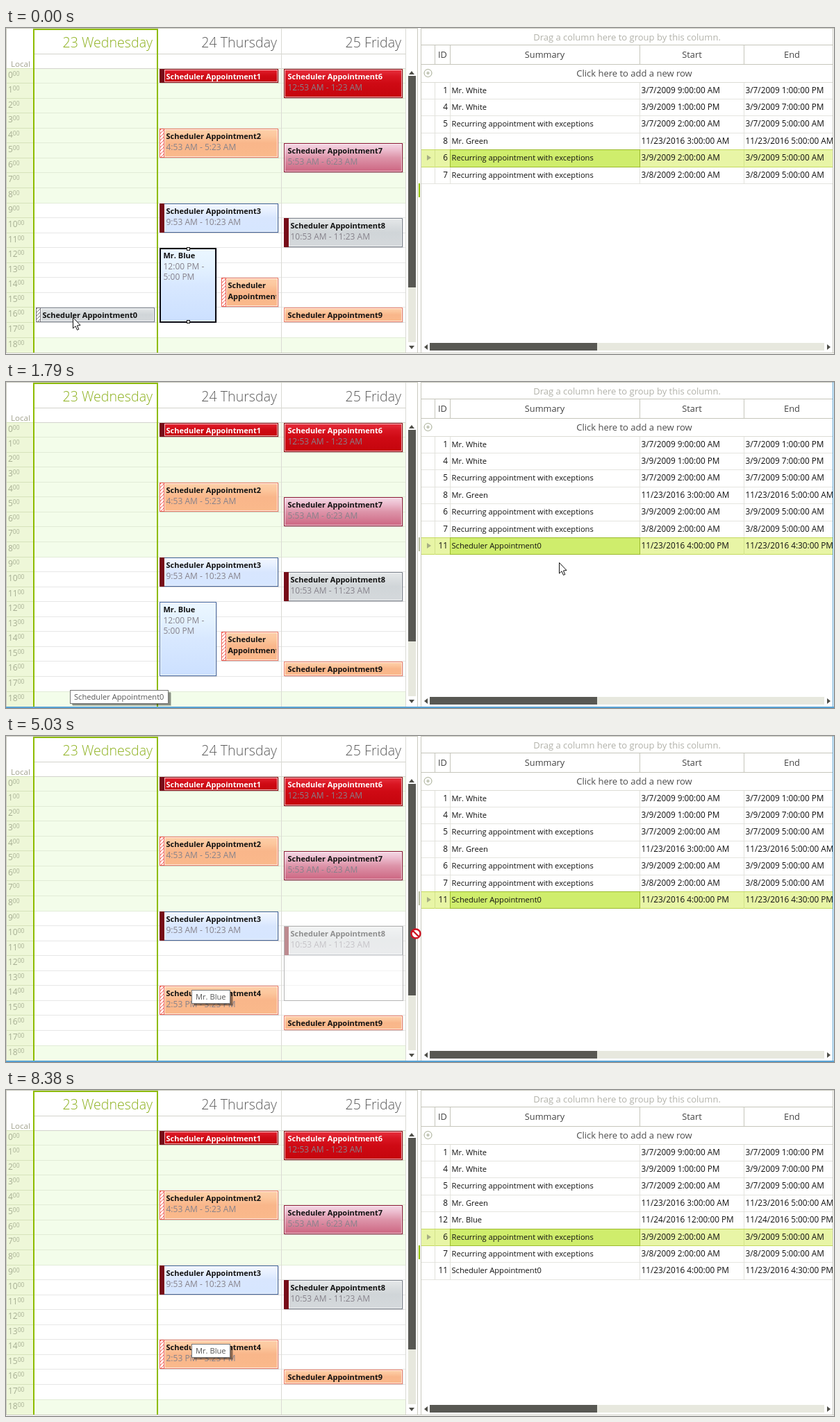
Recreate the animation shown at these times as an HTML page with a canvas. Size 1192 by 470 pixels, loop 8540 ms.

```html
<!DOCTYPE html>
<html lang="en">
<head>
<meta charset="utf-8">
<title>Scheduler drag and drop</title>
<style>
html, body { margin: 0; width: 100%; height: 100%; overflow: hidden; background: #fff; }
canvas { display: block; }
</style>
</head>
<body>
<canvas id="stage" width="1192" height="470"></canvas>
<script>
const ctx = document.getElementById('stage').getContext('2d');
const LOOP = 8540, STEP = 120;
const FONT = '"Open Sans", "Noto Sans", sans-serif';
const DRAG1 = 760, DROP1 = 1790, DRAG2 = 4910, DROP2 = 6240, END = 8380;
const GREEN = '#8ebc00', LINE = '#c9c9bf', INK = '#111';

const hourY = h => 59 + Math.round(21.55 * h - 0.4);
const rowY = i => Math.floor(79 + 24.4 * i);

// start time, steps, end point, pointer kind
const path = [
  [0, 1, 96, 417, 'arrow'],
  [120, 1, 89, 419, 'arrow'],
  [370, 3, 94, 415, 'arrow'],
  [760, 1, 273, 410, 'stop'],
  [880, 1, 452, 392, 'stop'],
  [1000, 1, 622, 359, 'drag'],
  [1150, 4, 796, 260, 'drag'],
  [1790, 1, 796, 260, 'arrow'],
  [2820, 6, 375, 400, 'arrow'],
  [3570, 3, 261, 343, 'arrow'],
  [3960, 1, 259, 338, 'arrow'],
  [4910, 1, 430, 300, 'stop'],
  [5030, 1, 590, 285, 'stop'],
  [5150, 1, 744, 258, 'drag'],
  [5300, 2, 786, 182, 'drag'],
  [5570, 3, 697, 174, 'drag'],
  [6240, 1, 697, 174, 'arrow'],
  [7140, 1, 752, 190, 'arrow'],
  [7260, 7, 800, 442, 'arrow'],
  [8380, 1, 0, 0, 'none']
];

const orange = { fill: ['#fdd0aa', '#fcc79d', '#f9b68a', '#fab98b'], edge: '#f0816a', hatch: '#ee5a50' };
const grey = { fill: ['#e6e9ea', '#dadee0', '#d0d5d8', '#d5d9dc'], edge: '#7c848e' };
const red = { fill: ['#e93442', '#d91622', '#cf0a14', '#c4040c'], edge: '#8d0710', ink: '#fff' };
const pink = { fill: ['#f5dbe8', '#ebbacc', '#dd94a9', '#cc6480'], edge: '#8f1738' };
const blue = { fill: ['#f3f7ff', '#e7f0ff', '#d8e6fe', '#d6e6ff'], edge: '#45689f' };
const sky = { fill: ['#ecf7ff', '#e4f2ff', '#d8e8ff', '#cce0ff'], edge: '#4a6da6' };

function rect(x, y, w, h, color) {
  ctx.fillStyle = color;
  ctx.fillRect(x, y, w, h);
}

function frame(x, y, w, h, color) {
  ctx.strokeStyle = color;
  ctx.lineWidth = 1;
  ctx.strokeRect(x + 0.5, y + 0.5, w - 1, h - 1);
}

function text(s, x, y, size, color, align = 'left', weight = 400) {
  ctx.font = `${weight} ${size}px ${FONT}`;
  ctx.fillStyle = color;
  ctx.textAlign = align;
  ctx.fillText(s, x, y);
}

function poly(points, fill) {
  ctx.beginPath();
  points.forEach(([x, y]) => ctx.lineTo(x, y));
  ctx.closePath();
  ctx.fillStyle = fill;
  ctx.fill();
}

function clipped(x, y, w, h, draw) {
  ctx.save();
  ctx.beginPath();
  ctx.rect(x, y, w, h);
  ctx.clip();
  draw();
  ctx.restore();
}

function hatch(x, y, h, color) {
  rect(x, y, 7, h, '#fff');
  clipped(x, y, 7, h, () => {
    ctx.strokeStyle = color;
    ctx.lineWidth = 1;
    ctx.beginPath();
    for (let k = 3; k < h + 10; k += 5) {
      ctx.moveTo(x, y + k);
      ctx.lineTo(x + 7, y + k - 7);
    }
    ctx.stroke();
  });
  frame(x, y, 7, h, color);
}

function appointment(x, hour, w, hours, look, bar, title, lines = []) {
  const y = hourY(hour), h = hourY(hour + hours) - y - 1;
  rect(x + 1, y + 1, w, h, 'rgba(90,90,100,.2)');
  const g = ctx.createLinearGradient(0, y, 0, y + h);
  look.fill.forEach((c, i) => g.addColorStop([0, 0.25, 0.5, 1][i], c));
  rect(x, y, w, h, g);
  const inset = bar ? 7 : 1;
  frame(x + inset, y + 1, w - inset - 1, h - 2, 'rgba(255,255,255,.7)');
  frame(x, y, w, h, look.edge);
  if (bar === 'busy') rect(x, y, 7, h, '#760c18');
  if (bar === 'tentative') hatch(x, y, h, look.hatch || '#77757d');
  const tx = x + (bar ? 9.5 : 5.5);
  clipped(x, y, w - 3, h, () => {
    text(title, tx, y + 14.5, 11, look.ink || INK, 'left', 700);
    lines.forEach(([s, bold], i) =>
      text(s, tx, y + 30.5 + i * 15.5, bold ? 11 : 12, bold ? INK : '#86828b', 'left', bold ? 700 : 400));
  });
}

function ghost(x, hour, hours) {
  const y = hourY(hour), h = hourY(hour + hours) - y;
  rect(x, y, 172, h, 'rgba(255,255,255,.52)');
  frame(x, y, 172, h, '#b4b4b4');
}

function calendar(t) {
  // grid
  rect(41, 59, 534, hourY(9) - 59, '#f3fdea');
  rect(41, hourY(18), 534, 468 - hourY(18), '#f3fdea');
  rect(1, 59, 38, 409, '#eef7d8');
  for (let h = 0; h < 19; h++) {
    const y = hourY(h);
    rect(41, y - 1, 534, 1, h < 10 || h > 17 ? '#e2ecd7' : '#e7e7e7');
    rect(1, y - 1, 38, 1, '#d6e2bb');
    text(h, 3, y + 13, 12, '#a7af93');
    text('00', 3 + ctx.measureText(h).width, y + 9.5, 8.5, '#a7af93');
  }
  text('Local', 7, 56, 11.6, '#a3a38f');
  rect(0, 0, 593, 1, LINE);
  rect(0, 0, 1, 469, LINE);
  rect(41, 37, 534, 1, '#d4d4cd');
  rect(41, 58, 534, 1, '#d4d4cd');
  rect(396, 1, 1, 467, '#dadad4');
  rect(575, 1, 1, 467, '#dadad4');
  rect(39, 1, 180, 2, GREEN);
  rect(39, 1, 2, 467, GREEN);
  rect(217, 1, 2, 467, GREEN);
  text('23 Wednesday', 211, 28, 19.6, '#8cb01c', 'right', 300);
  text('24 Thursday', 390, 28, 19.6, '#5c5c5c', 'right', 300);
  text('25 Friday', 569, 28, 19.6, '#5c5c5c', 'right', 300);

  // appointments
  const name = n => 'Scheduler Appointment' + n;
  if (t < DRAG1) appointment(43, 16, 171, 1, grey, 'tentative', name(0));
  appointment(221, 0, 171, 1, red, 'busy', name(1));
  appointment(221, 4, 171, 2, orange, 'tentative', name(2), [['4:53 AM - 5:23 AM']]);
  appointment(221, 9, 171, 2, blue, 'busy', name(3), [['9:53 AM - 10:23 AM']]);
  if (t < DRAG2) {
    appointment(221, 12, 82, 5, sky, '', 'Mr. Blue', [['12:00 PM -'], ['5:00 PM']]);
    appointment(310, 14, 82, 2, orange, 'tentative', 'Scheduler', [['Appointment4', true]]);
  } else {
    appointment(221, 14, 171, 2, orange, 'tentative', name(4), [['2:53 PM - 3:23 PM']]);
  }
  appointment(400, 0, 171, 2, red, '', name(6), [['12:53 AM - 1:23 AM']]);
  appointment(400, 5, 171, 2, pink, '', name(7), [['5:53 AM - 6:23 AM']]);
  appointment(400, 10, 171, 2, grey, 'busy', name(8), [['10:53 AM - 11:23 AM']]);
  appointment(400, 16, 171, 1, orange, '', name(9));

  if (t < DRAG1) {
    ctx.strokeStyle = '#0b0b14';
    ctx.lineWidth = 2;
    ctx.strokeRect(222, 318, 80, 106);
    for (const y of [316, 421]) {
      rect(260, y, 5, 5, INK);
      rect(261, y + 1, 3, 3, '#fff');
    }
  } else if (t < 880) {
    ghost(43, 16, 1);
    rect(125, 401, 5, 1, '#222');
  } else if (t < DROP1) {
    ghost(400, 15, 1);
  }
  if (t >= DRAG2 && t < DROP2) ghost(400, 10, 5);

  // vertical scroll bar
  rect(579, 69, 11, 384, '#e7e8de');
  rect(579, 69, 11, 305, '#585853');
  poly([[580, 67], [588, 67], [584, 62]], '#4e4e48');
  poly([[580, 458], [588, 458], [584, 463]], '#4e4e48');
  rect(592, 0, 1, 468, LINE);
  const dim = t >= DROP1 && t < DROP2;
  rect(594, 224, 2, 20, dim ? '#b5bb9e' : GREEN);
}

function rowsAt(t) {
  const repeat = 'Recurring appointment with exceptions';
  const day = (d, a, b) => [`${d} ${a}:00:00 `, `${d} ${b}:00:00 `];
  const [w1, w2] = day('3/7/2009', 9, 1), [x1, x2] = day('3/9/2009', 1, 7);
  const rec = d => day(d, 2, 5).map(s => s + 'AM');
  const rows = [
    [1, 'Mr. White', w1 + 'AM', w2 + 'PM'],
    [4, 'Mr. White', x1 + 'PM', x2 + 'PM'],
    [5, repeat, ...rec('3/7/2009')],
    [8, 'Mr. Green', ...day('11/23/2016', 3, 5).map(s => s + 'AM')],
    [6, repeat, ...rec('3/9/2009')],
    [7, repeat, ...rec('3/8/2009')]
  ];
  if (t >= DROP1) rows.push([11, 'Scheduler Appointment0', '11/23/2016 4:00:00 PM', '11/23/2016 4:30:00 PM']);
  if (t >= DROP2) rows.splice(4, 0, [12, 'Mr. Blue', ...day('11/24/2016', 12, 5).map(s => s + 'PM')]);
  return rows;
}

function table(t, pointer) {
  const right = 1190, columns = [617, 639, 912, 1062];
  rect(597, 0, 595, 1, LINE);
  rect(597, 0, 1, 468, LINE);
  for (const y of [24, 52]) rect(598, y, right - 598, 1, '#c6c6bc');
  rect(598, 78, right - 598, 1, '#dcdcd5');
  for (const x of columns) rect(x, 24, 1, 29, '#c6c6bc');
  text('Drag a column here to group by this column.', 894, 18, 13, '#b2b2aa', 'center');
  text('ID', 628.5, 43, 12.8, '#444', 'center');
  text('Summary', 775.5, 43, 12.8, '#444', 'center');
  text('Start', 987.5, 43, 12.8, '#444', 'center');
  text('End', 1131.5, 43, 12.8, '#444', 'center');
  text('Click here to add a new row', 904.5, 70, 13, '#4c4c4c', 'center');
  ctx.strokeStyle = '#a4aa91';
  ctx.lineWidth = 1;
  ctx.beginPath();
  ctx.arc(607.5, 65, 5.5, 0, Math.PI * 2);
  ctx.stroke();
  rect(605, 64.5, 5, 1, '#a4aa91');
  rect(607, 62.5, 1, 5, '#a4aa91');

  const rows = rowsAt(t);
  const current = t >= DROP1 && t < DROP2 ? 11 : 6;
  const hover = pointer.kind === 'arrow' && pointer.x > 598 ? Math.floor((pointer.y - 79) / 24.4) : -1;
  rows.forEach(([id, summary, start, end], i) => {
    const y = rowY(i), h = rowY(i + 1) - y, base = y + 15;
    const on = id === current;
    if (on) rect(598, y, right - 598, h, '#e8f5a6');
    else if (i === hover) rect(598, y, right - 598, h, '#f3f5f5');
    rect(598, y + h - 1, right - 598, 1, on ? '#c5da60' : '#e5e5e0');
    for (const x of columns) rect(x, y, 1, h, on ? '#d3e38c' : '#e2e2dc');
    if (on) {
      rect(598, y - 1, right - 598, 1, '#c5da60');
      rect(639, y - 1, 274, h + 1, '#cfed6c');
      frame(639, y - 1, 274, h + 1, '#9cbb2e');
      poly([[606, y + 7], [606, y + 15], [612, y + 11]], '#a5ad83');
    }
    text(id, 636, base, 11.8, INK, 'right');
    text(summary, 641.5, base, 11.15, INK);
    text(start, 914.5, base, 11.8, INK);
    clipped(1063, y, right - 1063, h, () => text(end, 1064.5, base, 11.8, INK));
  });

  // horizontal scroll bar
  rect(610, 454, 568, 11, '#e7e8de');
  rect(610, 454, 241, 11, '#585853');
  poly([[607, 456], [607, 464], [602, 460]], '#4e4e48');
  poly([[1182, 456], [1182, 464], [1187, 460]], '#4e4e48');
}

function tooltip(s, x, y, w, alpha) {
  if (alpha <= 0) return;
  ctx.save();
  ctx.globalAlpha = alpha;
  rect(x + 4, y + 4, w, 19, 'rgba(0,0,0,.2)');
  rect(x + 3, y + 3, w, 19, 'rgba(0,0,0,.3)');
  rect(x, y, w, 20, '#fff');
  frame(x, y, w, 20, '#777');
  text(s, x + 6, y + 14, 11.15, '#575757');
  ctx.restore();
}

function pointerAt(t) {
  let from = path[0], now = path[0];
  for (const p of path) if (p[0] <= t) { from = now; now = p; }
  const [start, n, x, y, kind] = now;
  const k = Math.min(n, Math.floor((t - start) / STEP) + 1) / n;
  return { x: Math.round(from[2] + (x - from[2]) * k), y: Math.round(from[3] + (y - from[3]) * k), kind };
}

function drawPointer({ x, y, kind }) {
  if (kind === 'none') return;
  ctx.save();
  ctx.translate(x, y);
  if (kind === 'stop') {
    ctx.beginPath();
    ctx.arc(0, 0, 6.5, 0, Math.PI * 2);
    ctx.moveTo(-4.5, -4.5);
    ctx.lineTo(4.5, 4.5);
    ctx.fillStyle = '#fff';
    ctx.fill();
    ctx.lineWidth = 2.4;
    ctx.strokeStyle = '#cf1424';
    ctx.stroke();
  } else {
    if (kind === 'drag') {
      rect(3, 13, 11, 10, '#fff');
      ctx.setLineDash([1, 1]);
      ctx.lineWidth = 2;
      ctx.strokeStyle = '#222';
      ctx.strokeRect(4, 14, 9, 8);
      ctx.setLineDash([]);
    }
    poly([[0.5, 0.5], [0.5, 16], [4, 12.8], [6.5, 18.4], [8.8, 17.4], [6.4, 12], [11, 11.5]], '#fff');
    ctx.lineWidth = 1;
    ctx.strokeStyle = INK;
    ctx.stroke();
  }
  ctx.restore();
}

// stepped fade level between two times
function fade(t, times) {
  return times.filter(s => t >= s).length / times.length;
}

function draw(t) {
  const pointer = pointerAt(t);
  rect(0, 0, 1192, 470, '#fff');
  calendar(t);
  table(t, pointer);
  const active = t >= DRAG1 && t < END, border = active ? '#58a2d4' : LINE;
  rect(0, 468, 1192, active ? 2 : 1, border);
  rect(1190, 0, 1, 468, border);
  tooltip('Scheduler Appointment0', 92, 444, 142, fade(t, [370, 490, 610]) - fade(t, [3300, 3420, 3570]));
  tooltip('Mr. Blue', 267, 366, 56, fade(t, [3960, 4080, 4230, 4350]));
  drawPointer(pointer);
}

function tick() {
  draw(performance.now() % LOOP);
  requestAnimationFrame(tick);
}
tick();
</script>
</body>
</html>
```
